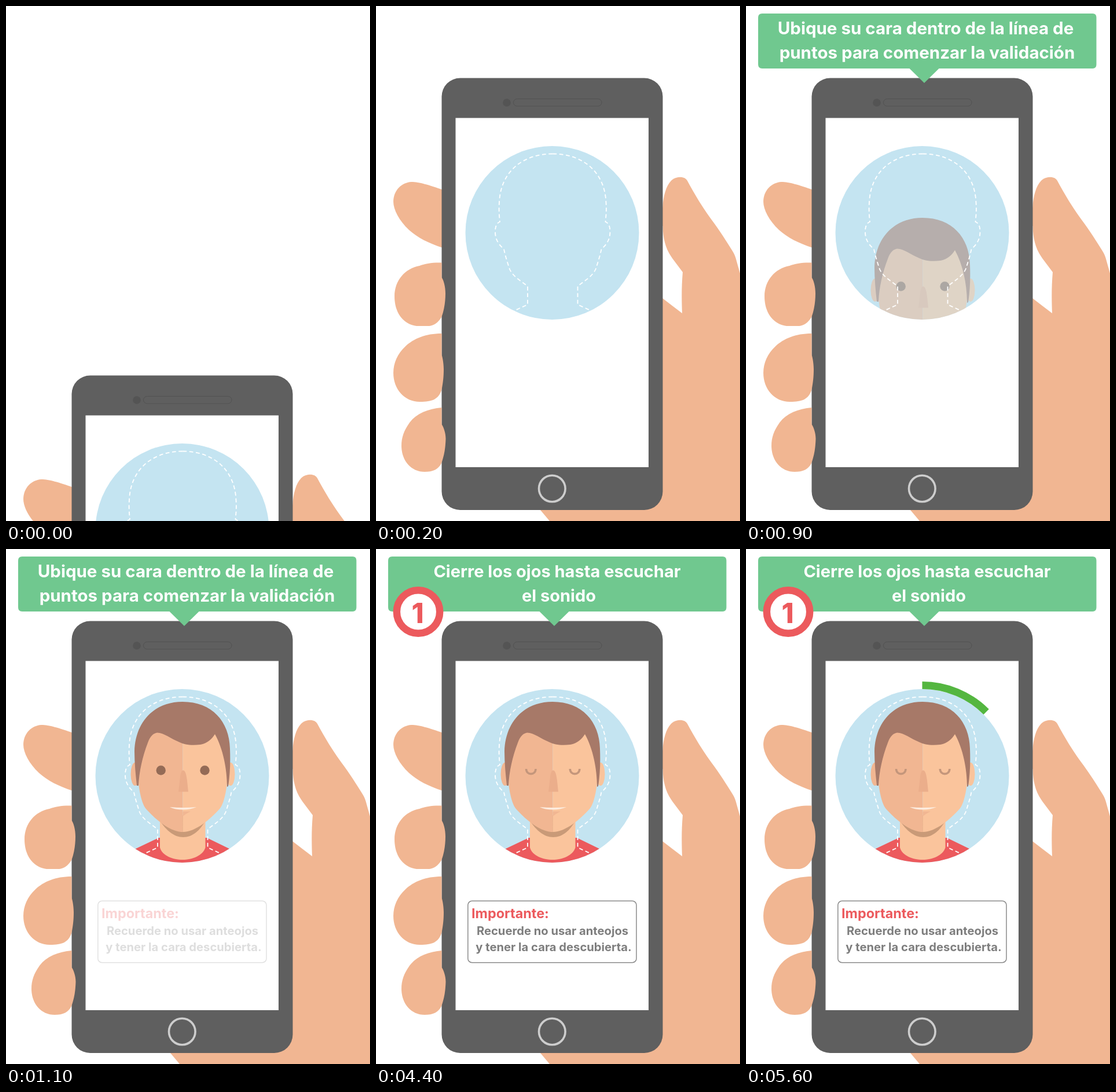
Animation of 629x890 px, one loop 8 s. Source, as an HTML page:

```html
<!DOCTYPE html>
<html lang="es">
<head>
<meta charset="utf-8">
<title>Validación facial</title>
<style>
  html, body { margin: 0; width: 100%; height: 100%; overflow: hidden; background: #fff; }
  svg { display: block; width: 100vw; height: 100vh; }
  text { font-family: Inter, "Open Sans", sans-serif; font-weight: 700; }
  .banner { fill: #fff; font-size: 29.5px; text-anchor: middle; }
  .note { fill: #7e7e7e; font-size: 20.2px; text-anchor: middle; }
  .skin { fill: #f1b692; }
  .light { fill: #fac49c; }
</style>
</head>
<body>
<svg viewBox="0 0 629 890" preserveAspectRatio="none">
  <defs>
    <clipPath id="disc"><circle cx="304.5" cy="392" r="150"/></clipPath>
    <path id="halfFace" d="M305.5 295H255C240 330 230 370 228 395C230 420 235 440 241 448C257 466 283 489 305.5 489Z"/>
    <path id="halfLine" d="M305.2 255.5C255 255.5 215 285 213 340C212 352 213 362 214 373C209 375 206 380 206 390C206 400 209 410 221 420C223 430 226 440 231 455C236 466 248 474 262 484V516L238 527"/>
  </defs>

  <g id="phone">
    <path class="skin" d="M490 350H495C497 320 505 298 522 296C530 295 535 297 538 302C552 328 564 347 576 364C588 380 601 399 612 417C619 428 620 430 622 437L629 462V890H300L284 871V800H400V505H495L529 531C528 505 528 485 530 460L512 436C500 419 496 402 495.500 380H490Z"/>
    <path class="skin" d="M116 318C90 309 75 304 61 304C44 305 30 319 30 338C30 352 40 371 57 387C72 400 90 410 116 418Z"/>
    <rect x="113.500" y="124.500" width="382" height="746.500" rx="32" fill="#5f5f5f"/>
    <rect x="137.500" y="193.500" width="333.500" height="603.500" fill="#fff"/>
    <circle cx="226" cy="167" r="6.800" fill="#545454"/>
    <rect x="237.500" y="160.500" width="152.500" height="12.500" rx="6.200" fill="none" stroke="#525252"/>
    <circle cx="304.300" cy="834" r="22.800" fill="none" stroke="#cdcdcd" stroke-width="3.600"/>
    <g class="skin">
      <path d="M113.500 443.500C98 443 85 445 75 449C50 454 32 474 32 502C32 530 47 550 70 553H92C100 552 108 547 113.500 537C118 525 120 510 120 497C120 485 117 474 113.500 469Z"/>
      <path d="M113.500 566C85 566 65 575 51 588C37 601 30 617 30 634C30 662 49 684 76 684C97 684 108 680 113.500 663C116 650 117 640 117 628C117 618 115 607 113.500 603Z"/>
      <path d="M113.500 694C90 696 70 704 58 720C48 734 44 746 44 760C44 785 60 805 84 805C99 805 108 801 113.500 789C118 776 120 764 120.500 748C120.500 738 117 728 113.500 723Z"/>
    </g>

    <circle cx="304.500" cy="392" r="150" fill="#c4e4f1"/>
    <g clip-path="url(#disc)">
      <g id="face">
        <path fill="#ec5a5d" d="M180 541L224 518L264 499H347L386 518L430 541V560H180Z"/>
        <path class="light" d="M266 465V516C270 530 288 537 305 537C322 537 340 530 344.500 516V465Z"/>
        <path fill="#c99a78" d="M266 470C277 486 290 498 306 498C323 498 335 486 344.500 470V460H266Z"/>
        <ellipse class="skin" cx="223" cy="389" rx="7.500" ry="20"/>
        <ellipse class="light" cx="388" cy="389" rx="7.500" ry="20"/>
        <use href="#halfFace" class="skin"/>
        <use href="#halfFace" class="light" transform="matrix(-1 0 0 1 611 0)"/>
        <path fill="#a77968" d="M226 409C224 390 222 370 222 350C223 300 255 264 305 264C356 264 386 298 387 345C388 370 387 390 384 410L382 411C382 380 375 345 361 320C356 328 348 336 336 338C320 340 308 338 300 334C285 328 272 317 261 317.500C252 319 248 327 245 335C236 358 230 385 229 409Z"/>
        <path fill="#ebae8b" d="M306 382.500C300.500 382.500 301 400 298 419.500H315C313 400 312 382.500 306 382.500Z"/>
        <path fill="#fcecdf" d="M283 446Q306 448 329 446Q318 450.500 306 450.500Q292 450.500 283 446Z"/>
        <path class="skin" d="M305.500 453.500H319C314 456 309 459 305.500 462Z"/>
        <g id="openEyes" fill="#946b56">
          <circle cx="267.700" cy="382.500" r="8.200"/><circle cx="343.500" cy="382.500" r="8.200"/>
        </g>
        <path id="closedEyes" fill="none" stroke="#c4967b" stroke-width="3.600" d="M259.500 380C259.500 391.500 276 391.500 276 380M335.300 380C335.300 391.500 351.800 391.500 351.800 380"/>
      </g>
    </g>
    <g id="outline" fill="none" stroke="#fff">
      <use href="#halfLine"/>
      <use href="#halfLine" transform="matrix(-1 0 0 1 610.500 0)"/>
    </g>
    <path id="progress" fill="none" stroke="#54b640" stroke-width="13"/>
  </g>

  <g id="note">
    <rect x="158.800" y="608.300" width="291.200" height="106.400" rx="7" fill="#fff" stroke="#8b8b8b" stroke-width="1.500"/>
    <text x="165" y="637.500" font-size="23.400" fill="#ec5a5d">Importante:</text>
    <text class="note" x="305" y="667">Recuerde no usar anteojos</text>
    <text class="note" x="307" y="694.500">y tener la cara descubierta.</text>
  </g>

  <g id="banner">
    <path fill="#70c88f" d="M28 13H599Q605.500 13 605.500 20V101Q605.500 108 599 108H333.500L308 133L282.500 108H28Q21 108 21 101V20Q21 13 28 13Z"/>
    <g id="place">
      <text class="banner" x="310.500" y="49">Ubique su cara dentro de la línea de</text>
      <text class="banner" x="313" y="91">puntos para comenzar la validación</text>
    </g>
    <g id="close">
      <text class="banner" x="313" y="49" style="font-size:29px">Cierre los ojos hasta escuchar</text>
      <text class="banner" x="316" y="91" style="font-size:29px">el sonido</text>
      <circle cx="73" cy="108.500" r="37.200" fill="#fff" stroke="#ec5a5d" stroke-width="12.500"/>
      <text x="72" y="128" font-size="48" text-anchor="middle" fill="#ec5a5d" style="font-weight:800">1</text>
    </g>
  </g>
</svg>
<script>
  const LOOP = 8000, STEP = 100, SECOND_PART = 4400;
  const el = id => document.getElementById(id);
  const ramp = (t, from, to) => Math.min(1, Math.max(0, (t - from) / (to - from)));
  const set = (id, attrs) => Object.entries(attrs).forEach(([k, v]) => el(id).setAttribute(k, v));
  const show = (id, on) => set(id, { display: on ? "inline" : "none" });

  function arc(angle) {
    const r = 156.5;
    return `M304.500 ${392 - r}A${r} ${r} 0 0 1 ${304.5 + r * Math.sin(angle)} ${392 - r * Math.cos(angle)}`;
  }

  function render(time) {
    const t = Math.floor((time % LOOP) / STEP) * STEP;
    const closed = t >= SECOND_PART;
    const rise = ramp(t, 700, 1100);
    const bold = closed ? 0 : ramp(t, 1100, 1400);
    const sweep = ramp(t, 5200, 5600);

    set("phone", { transform: `translate(0 ${514 * (1 - ramp(t, 0, 200))})` });
    set("banner", { opacity: ramp(t, 200, 600) });
    set("face", { opacity: rise, transform: `translate(0 ${204 * (1 - rise)})` });
    set("note", { opacity: ramp(t, 1000, 1400) });
    set("outline", {
      "stroke-width": 1.8 + 4.4 * bold,
      "stroke-dasharray": bold ? "4.5 8" : "6.8 4.6",
      "stroke-linecap": bold ? "round" : "butt"
    });
    set("progress", { d: arc(sweep * Math.PI / 4) });
    show("progress", sweep > 0);
    show("openEyes", !closed);
    show("closedEyes", closed);
    show("place", !closed);
    show("close", closed);
  }

  const start = performance.now();
  function tick() {
    render(performance.now() - start);
    requestAnimationFrame(tick);
  }
  tick();
</script>
</body>
</html>
```
